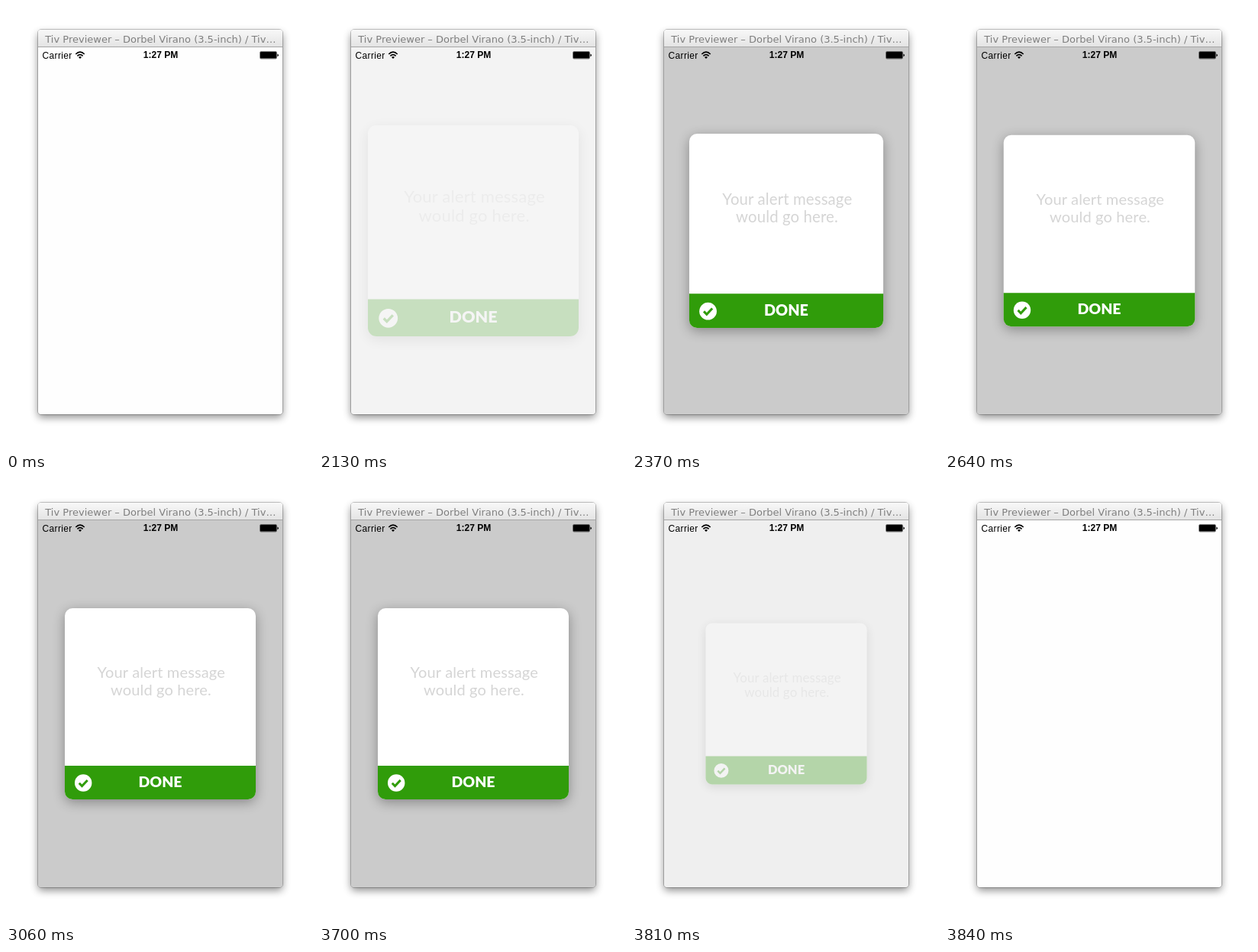
These frames come from a looping animation (402x582 px, 4.8 s). An HTML page:

```html
<!DOCTYPE html>
<html lang="en">
<head>
<meta charset="utf-8">
<title>Alert</title>
<style>
  html, body { margin: 0; width: 100%; height: 100%; overflow: hidden; background: #fff; }
  svg { display: block; width: 402px; height: 582px; }
  .title { font: 13px "DejaVu Sans", sans-serif; fill: #7f7f7f; }
  .status { font: 12px "Liberation Sans", Arial, sans-serif; letter-spacing: .35px; }
  .clock { font-weight: bold; letter-spacing: 0; }
  .message { font: 20px Lato, sans-serif; letter-spacing: .15px; fill: #d5d5d5; }
  .done { font: 900 19.5px Lato, sans-serif; fill: #fff; }
  .mid { text-anchor: middle; }
  .window-shadow { filter: blur(5.5px); opacity: .45; }
  .card-shadow { filter: blur(8px); opacity: .33; }
  #alert { transform-origin: 202px 294px; }
</style>
</head>
<body>
<svg viewBox="0 0 402 582">
  <defs>
    <linearGradient id="bar" x2="0" y2="1">
      <stop stop-color="#f8f8f8"/>
      <stop offset="1" stop-color="#e3e3e3"/>
    </linearGradient>
    <clipPath id="frame"><rect x="42" y="31" width="320" height="503" rx="4"/></clipPath>
  </defs>

  <rect class="window-shadow" x="42" y="36" width="320" height="502" rx="4"/>
  <rect x="41.5" y="30.5" width="321" height="504" rx="4.5" fill="none" stroke="#000" stroke-opacity=".22"/>
  <g clip-path="url(#frame)">
    <rect x="42" y="31" width="320" height="503" fill="#fefefe"/>
    <rect x="42" y="31" width="320" height="23" fill="url(#bar)"/>
    <rect x="42" y="53" width="320" height="1" fill="#a6a6a6"/>
    <rect id="dim" x="42" y="54" width="320" height="480" opacity="0"/>
  </g>
  <text class="title" x="51.3" y="48">Tiv Previewer – Dorbel Virano (3.5-inch) / Tiv…</text>

  <text class="status" x="47.5" y="69">Carrier</text>
  <g fill="none" stroke="#000" stroke-width="1.7">
    <path d="M91.3 63Q97 57.4 102.7 63"/>
    <path d="M93.4 65.3Q97 61.8 100.6 65.3"/>
  </g>
  <path d="M95 66.9Q97 65 99 66.9L97 68.9z"/>
  <text class="status clock mid" x="202.5" y="68.4">1:27 PM</text>
  <rect x="332.5" y="59.5" width="22" height="9.5" rx="1.5" fill="none" stroke="#000" stroke-opacity=".5"/>
  <rect x="333" y="60" width="21" height="8.5" rx=".8"/>
  <path d="M355.4 62.4q1.5.4 1.5 1.9t-1.5 1.9z"/>

  <g id="alert" opacity="0">
    <rect class="card-shadow" x="77" y="173" width="250" height="250" rx="10"/>
    <rect x="77" y="169" width="250" height="250" rx="10" fill="#fff"/>
    <path d="M77 375h250v34a10 10 0 0 1-10 10h-230a10 10 0 0 1-10-10z" fill="#309c0a"/>
    <text class="message mid" x="203.3" y="260.5">Your alert message</text>
    <text class="message mid" x="203" y="283">would go here.</text>
    <circle cx="101.2" cy="397.5" r="11.2" fill="#fff"/>
    <path d="M95.8 397.7l3.7 3.8 7.2-7.6" fill="none" stroke="#309c0a" stroke-width="3"/>
    <text class="done mid" x="202" y="403">DONE</text>
  </g>
</svg>
<script>
  const LOOP = 4800, TICK = 30;
  const OPEN = 2100, FADE_IN = 212;
  const CLOSE = 3720, FADE_OUT = 120;
  const alertBox = document.getElementById("alert");
  const dim = document.getElementById("dim");
  const clamp = x => Math.min(1, Math.max(0, x));

  function pose(t) {
    const shown = Math.sin(clamp((t - OPEN) / FADE_IN) * Math.PI / 2);
    const gone = clamp((t - CLOSE) / FADE_OUT) ** 1.25;
    const settle = .131 * Math.exp(-.0077 * Math.max(0, t - OPEN));
    return { alpha: shown * (1 - gone), scale: 1 + settle - .223 * gone };
  }

  function draw(now) {
    const t = Math.floor((now % LOOP) / TICK) * TICK;
    const { alpha, scale } = pose(t);
    alertBox.setAttribute("opacity", alpha);
    alertBox.style.transform = `scale(${scale})`;
    dim.setAttribute("opacity", .2 * alpha);
  }

  const start = performance.now();
  function tick() {
    draw(performance.now() - start);
    requestAnimationFrame(tick);
  }
  tick();
</script>
</body>
</html>
```
